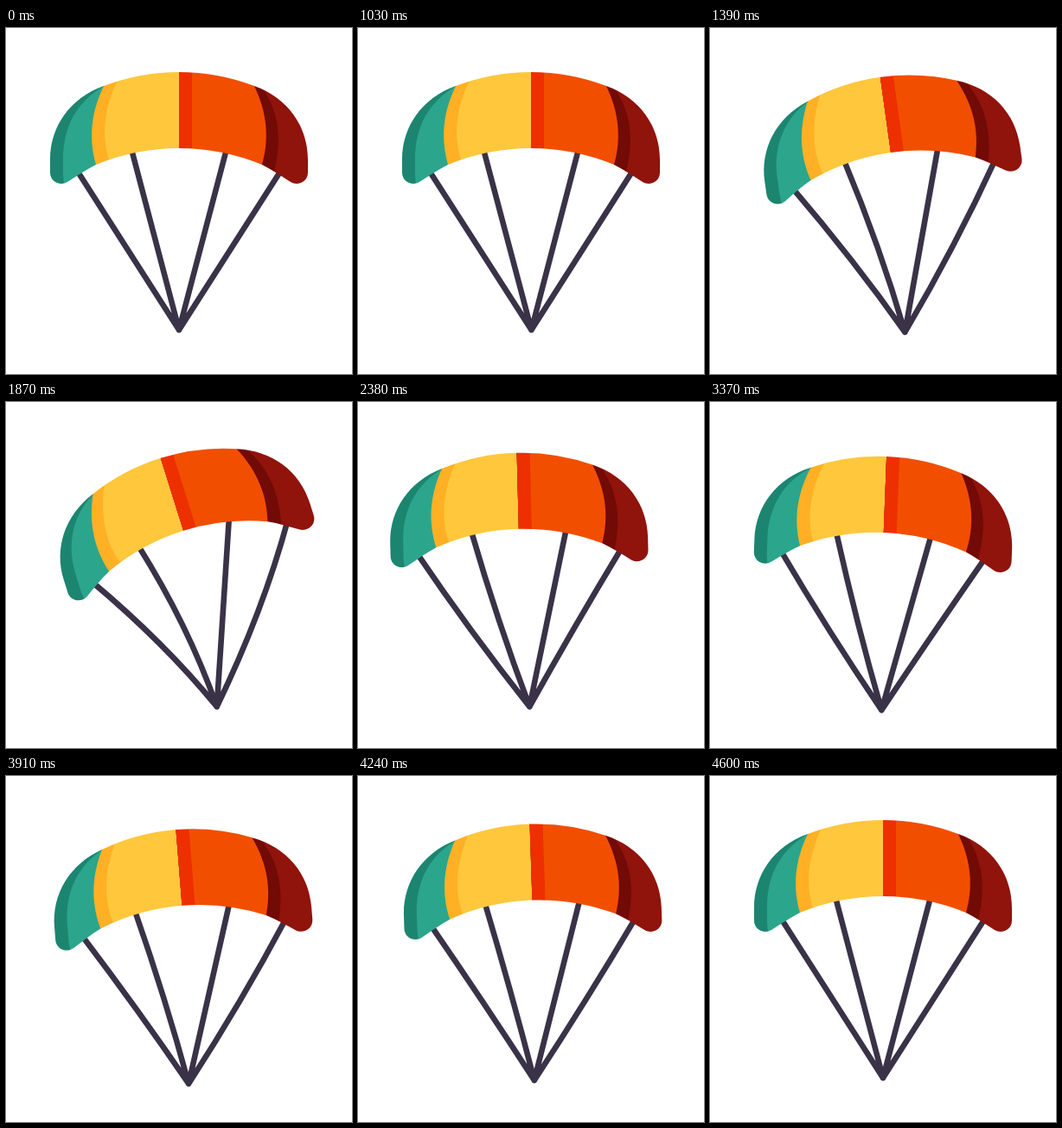
Recreate the animation shown at these times as an HTML page. Size 400 by 400 pixels, loop 4.63 s.

```html
<!DOCTYPE html>
<html lang="en">
<head>
<meta charset="utf-8">
<title>Parachute</title>
<style>
  html, body { margin: 0; width: 100%; height: 100%; overflow: hidden; background: #fff; }
  svg { display: block; width: 100%; height: 100%; }
</style>
</head>
<body>
<svg viewBox="0 0 400 400">
  <mask id="outline" maskUnits="userSpaceOnUse" x="40" y="40" width="320" height="160">
    <path fill="#fff" d="M113 67A244 244 0 0 1 287 67C326 81 349 114 349 152V167C349 178 337 183 329 178C318 171 308 164 296 158A252 252 0 0 0 104 158C92 164 82 171 71 178C63 183 51 178 51 167V152C51 114 74 81 113 67Z"/>
  </mask>
  <path id="cords" fill="none" stroke="#3a3247" stroke-width="6.6" stroke-linecap="round"/>
  <g id="canopy">
    <g mask="url(#outline)">
      <path fill="#1c8570" d="M40 40H200V200H40Z"/>
      <path fill="#2ca58d" d="M116 66C82 83 66 115 66 150V170L68 190H200V40Z"/>
      <path fill="#ffb024" d="M200 40H122L113 67C97 100 96 130 104 158L110 175H200Z"/>
      <path fill="#ffc73b" d="M200 40H138L128 62C112 97 111 128 119 152L124 170H200Z"/>
      <path fill="#90130c" d="M200 40H360V200H200Z"/>
      <path fill="#720a05" d="M200 40H278L295 67C316 97 319 130 310 166L304 185H200Z"/>
      <path fill="#f24e00" d="M200 40H278L287 67C303 100 304 130 296 158L290 175H200Z"/>
      <path fill="#ee2f00" d="M200 40H215V160H200Z"/>
    </g>
  </g>
</svg>
<script>
const LOOP = 4630, STEP = 30, FIRST = 10;
const START = 1030, LEFT = 1800, RIGHT = 2900, SETTLE = 3750, END = 4600;
const PIVOT_X = 200, PIVOT_Y = 95, APEX_X = 200, APEX_Y = 349;

const canopy = document.getElementById('canopy');
const cords = document.getElementById('cords');

// Eased step from 0 to 1, and a smooth bump from 0 to 1 and back.
const rise = (t, from, to) => {
  const p = Math.min(1, Math.max(0, (t - from) / (to - from)));
  return (1 - Math.cos(Math.PI * p)) / 2;
};
const bump = (t, from, to) => rise(t, from, (from + to) / 2) - rise(t, (from + to) / 2, to);

// Tilt in degrees: left, right, a little left again, then level.
const tilt = t => -17.7 * rise(t, START, LEFT) + 29.9 * rise(t, LEFT, RIGHT)
  - 17.2 * rise(t, RIGHT, SETTLE) + 5 * rise(t, SETTLE, END);

function draw(t) {
  const back = rise(t, SETTLE, END);
  const angle = tilt(t);
  const x = 3 * (rise(t, START, 1420) - rise(t, 3160, 3900)) - 19 * bump(t, 1380, 3160);
  const y = 12 * (rise(t, START, LEFT) - back) - 4.5 * bump(t, LEFT, 3200);

  // The apex swings against the tilt, slightly ahead of it.
  const apexX = APEX_X - 2.6 * tilt(t + 50);
  const apexY = APEX_Y + 3.2 * rise(t, START, 1540) + 4.1 * rise(t, 2380, 3500) - 7.3 * back;

  const rad = angle * Math.PI / 180, cos = Math.cos(rad), sin = Math.sin(rad);
  const place = (px, py) => {
    const dx = px - PIVOT_X, dy = py - PIVOT_Y;
    return [PIVOT_X + x + dx * cos - dy * sin, PIVOT_Y + y + dx * sin + dy * cos];
  };

  // A cord leaves the canopy along its own tilt, then bends towards the apex.
  const cord = (ax, ay, taut) => {
    const top = place(ax, ay);
    const bend = taut ? top : place((ax + APEX_X) / 2, (ay + APEX_Y) / 2);
    return `M${top}Q${bend} ${apexX},${apexY}`;
  };

  canopy.setAttribute('transform', `translate(${x} ${y}) rotate(${angle} ${PIVOT_X} ${PIVOT_Y})`);
  cords.setAttribute('d',
    cord(81, 163) + cord(145, 140) + cord(255, 140, true) + cord(319, 163));
}

function tick() {
  const t = performance.now() % LOOP;
  draw(Math.floor((t - FIRST) / STEP) * STEP + FIRST);
  requestAnimationFrame(tick);
}
tick();
</script>
</body>
</html>
```
